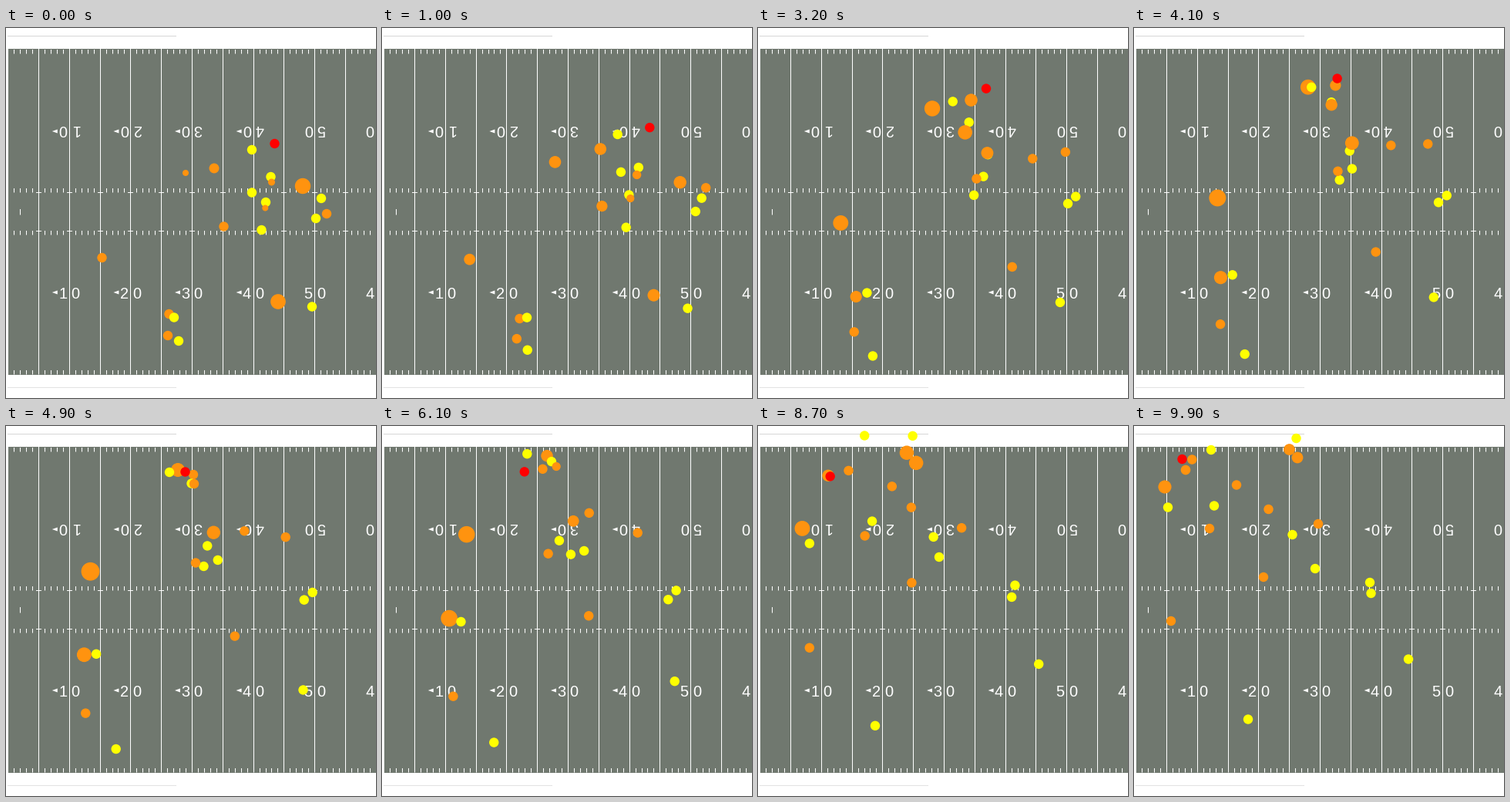
Animation of 480x480 px, one loop 10 s. Source, as a matplotlib script:

```python
import numpy as np
import matplotlib.pyplot as plt
from matplotlib.animation import FuncAnimation
from matplotlib.patches import Circle, Polygon, Rectangle

SIZE, DPI = 480, 100
FRAMES, STEP = 100, 100
PX = 72 / DPI

TURF, YELLOW, ORANGE, RED = "#70786f", "#ffff00", "#ff930f", "#ff0000"
LEFT, TOP, BOTTOM = 3, 27, 449.5
GOAL, YARD = 2.7, 7.96
HASHES = 213.5, 263.5
RADIUS = 6.2

# Times in seconds of a path's points, by how many it has
KEYS = {3: [0, 4.9, 9.9], 4: [0, 2, 7.3, 9.9], 5: [0, 2, 4.9, 7.3, 9.9]}

fig = plt.figure(figsize=(SIZE / DPI, SIZE / DPI), dpi=DPI, facecolor="white")
ax = fig.add_axes([0, 0, 1, 1])
ax.set_xlim(0, SIZE)
ax.set_ylim(SIZE, 0)
ax.axis("off")


def line(x0, y0, x1, y1, color="white"):
    ax.plot([x0, x1], [y0, y1], color=color, lw=PX, snap=False,
            solid_capstyle="butt", zorder=1)


def digit(x, y, char, flipped=False):
    ax.text(x, y, char, color="white", fontsize=20 * PX, family="Liberation Sans",
            ha="center", va="baseline", rotation=180 if flipped else 0,
            rotation_mode="anchor", zorder=1)


def arrow(x, y):
    ax.add_patch(Polygon([(x, y), (x + 7, y - 2.5), (x + 7, y + 2.5)],
                         fc="white", lw=0, zorder=1))


def draw_field():
    line(2, 10.5, 221, 10.5, "#d6d6d6")
    line(2, 466.5, 221, 466.5, "#e2e2e2")
    ax.add_patch(Rectangle((LEFT, TOP), SIZE - LEFT, BOTTOM - TOP,
                           fc=TURF, lw=0, zorder=0))
    for yard in range(1, 60):
        x = int(GOAL + yard * YARD) + 0.5
        if yard % 5 == 0:
            line(x, TOP, x, BOTTOM)
            for y in HASHES:
                line(x - 3.5, y, x + 3.5, y)
        else:
            for y in (28, 208, 263, 444):
                line(x, y, x, y + 5.5)
    for ten in range(1, 7):
        x = GOAL + ten * 10 * YARD
        tens = str(min(ten, 10 - ten))
        for y, flipped in ((351, False), (126.5, True)):
            pair = ("0", tens) if flipped else (tens, "0")
            digit(x - 8.5, y, pair[0], flipped)
            digit(x + 7.7, y, pair[1], flipped)
        if ten < 5:
            arrow(x - 22.5, 343)
            arrow(x - 22.5, 134)
    line(18.5, 235, 18.5, 242.5)


players = []


def player(color, *points, z=2, pulses=()):
    """A dot on the smooth curve through its points.

    Each pulse (time, amount, width) swells or shrinks the dot linearly.
    """
    dot = Circle(points[0], RADIUS, fc=color, lw=0, zorder=z)
    ax.add_patch(dot)
    n = len(points)
    players.append((dot, np.polyfit(KEYS[n], points, n - 1), pulses))


def blocker(*points):
    player(YELLOW, *points, z=3)


def chaser(*points, **options):
    player(ORANGE, *points, **options)


draw_field()

# Ball carrier
player(RED, (348.5, 150), (330.5, 104.5), (232.5, 59.5), (139.5, 65), (62.5, 43), z=5)

# Lead blockers
blocker((319, 158), (283.5, 119), (212, 60), (167, 18), (100, 31))
blocker((319, 213.5), (295.5, 158), (205.5, 25), (210.5, 16))
blocker((343.5, 193), (319, 172), (194.5, 139.5), (104, 103.5))
blocker((337, 226), (306.5, 206), (248, 152), (205.5, 141))
blocker((331.5, 262), (300, 243), (256.5, 182), (238, 162), (235, 185))

# Back side
blocker((409, 221), (416, 220), (361.5, 210.5), (306, 203))
blocker((402, 247), (407, 232), (353, 224.5), (307.5, 217))
blocker((397, 361.5), (395, 362), (373, 320), (356, 302.5))
blocker((218, 375.5), (164, 366), (87.5, 208), (44, 105.5))
blocker((224, 406), (165, 424), (149.5, 400.5), (148, 380.5))

# Chasers in the open
chaser((124.5, 298), (108.5, 286), (105.5, 98), (67, 57), pulses=[(5, 5.8, 5)])
chaser((211.5, 371), (152, 370.5), (74, 197), (40, 79), pulses=[(7, 5.6, 5)])
chaser((210, 399), (148, 402), (82, 324), (48, 253))
chaser((353, 355), (345.5, 332.5), (237, 223), (168, 196), pulses=[(0, 3.6, 2)])
chaser((416, 241), (415, 182), (299.5, 135.5), (239, 127))
chaser((385, 205), (378, 189), (225, 93), (133, 76.5), pulses=[(0, 4, 2)])

# Chasers held up by the lead blockers
chaser((233, 188), (224, 145), (223, 57), (202, 33), (201.5, 30.5),
       pulses=[(0, -2.7, 1), (3.5, 4.3, 4), (7.3, -3.7, 1), (8.9, 3.5, 1.5)])
chaser((270, 182), (286, 127), (243, 63), (168, 57), (75.3, 43.5),
       pulses=[(2.3, 3.2, 2.5)])
chaser((282.5, 257.5), (281, 189.5), (244, 75), (212, 46), (212, 41), z=4,
       pulses=[(2.7, 4, 2.2), (7.3, -4.2, 1.4), (8.9, 3.5, 1.5)])
chaser((344.5, 200), (316, 178.5), (226, 112), (174.5, 108), z=4,
       pulses=[(0, -1.7, 1.5), (4.4, 3, 2.8)])
chaser((336.3, 233.5), (246, 177.5), (98, 133), z=4, pulses=[(0, -2.2, 2)])


def update(frame):
    t = frame * STEP / 1000
    for dot, curve, pulses in players:
        dot.center = np.polyval(curve, t)
        dot.radius = RADIUS + sum(amount * max(0, 1 - abs(t - at) / width)
                                  for at, amount, width in pulses)
    return [p[0] for p in players]


anim = FuncAnimation(fig, update, frames=FRAMES, interval=STEP,
                     init_func=lambda: update(0), repeat=True, repeat_delay=0)
plt.show()
```
